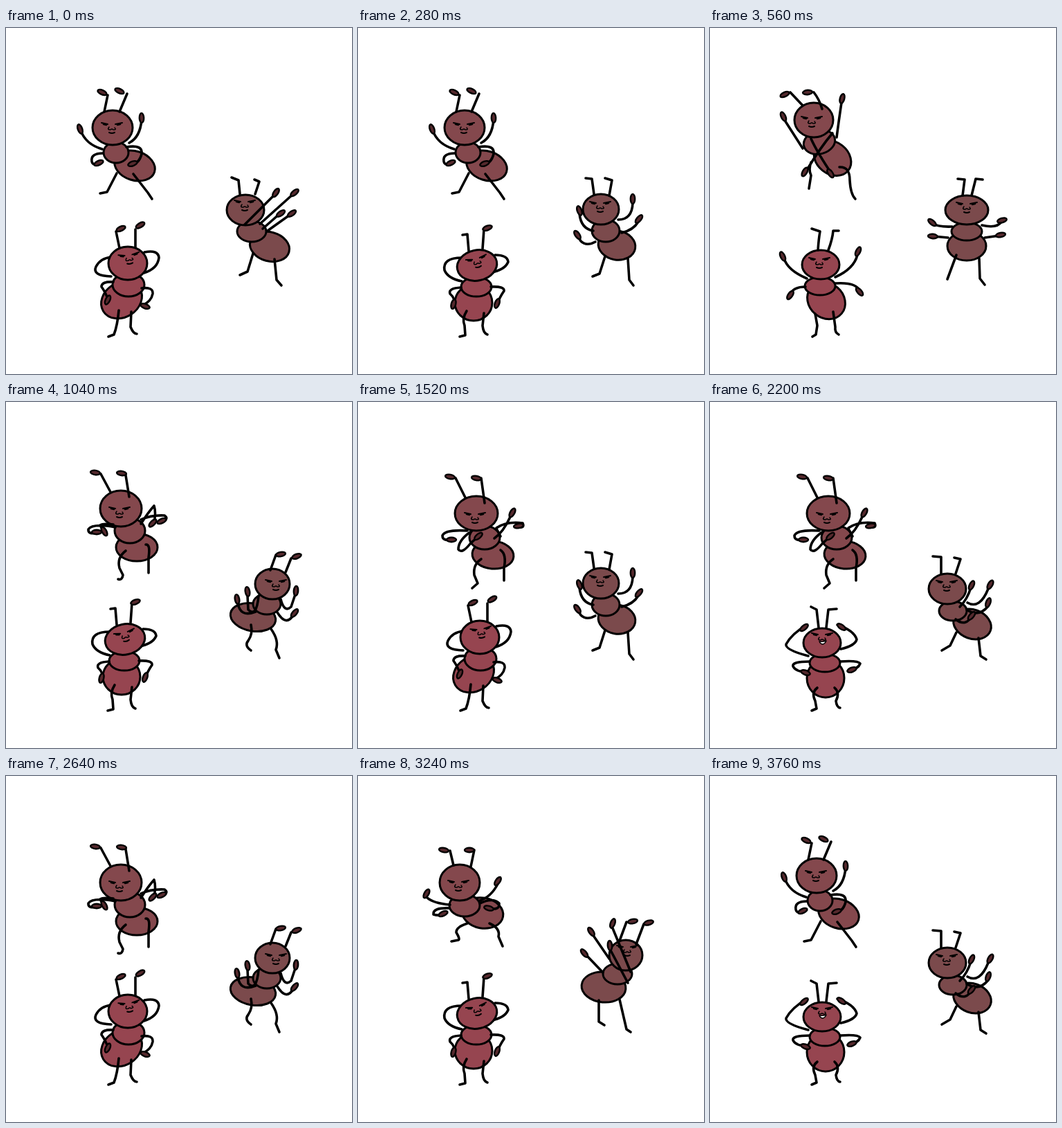
An HTML page with a canvas that plays this animation: 500x500 px, repeating every 3.84 s.

```html
<!DOCTYPE html>
<html lang="en">
<head>
<meta charset="utf-8">
<title>Dancing ants</title>
<style>
  html, body { margin: 0; width: 100%; height: 100%; overflow: hidden; background: #fff; }
  canvas { display: block; width: 100vmin; height: 100vmin; }
</style>
</head>
<body>
<canvas id="stage" width="500" height="500"></canvas>
<script>
const ctx = document.getElementById('stage').getContext('2d');
const LOOP = 3840, TICK = 40;

// body: abdomen, thorax, head as [x, y, rx, ry, degrees]; tips: [x, y, degrees]; face: [x, y, degrees]
const pose = (body, line, tips, face, extra) => ({ body, line, tips, face, ...extra });

const top0 = pose(
  [[186, 199, 30, 21, 18], [159, 180, 18, 15, 0], [154, 144, 29, 25, 0]],
  `M142 121L147 97M164 121L175 95M139 175Q115 168 108 148M178 166Q194 158 196 132
   M140 181Q122 181 124 193Q126 200 134 195M174 172Q198 168 196 182Q192 198 178 197
   M160 210L146 237 136 239M184 211L205 238 211 247`,
  [[139, 93, 25], [164, 91, 25], [107, 146, 70], [196, 130, 88], [134, 195, -25], [183, 196, -20]],
  [153, 143, 0]);

const top1 = pose(
  [[177, 188, 29, 23, 38], [158, 165, 23, 17, -15], [150, 133, 28, 25, 0]],
  `M134 112L116 93M162 117Q158 103 150 93M134 174L109 135M183 158Q186 135 190 108
   M177 152Q160 172 140 205M146 160Q155 180 178 214
   M146 194Q142 205 146 213L143 232M187 201Q202 200 202 220Q203 240 210 247`,
  [[108, 96, -25], [141, 93, -5], [106, 128, 65], [191, 102, -75], [137, 208, -60], [174, 210, 55]],
  [147, 134, 0]);

const top2 = pose(
  [[195, 221, 30, 20, 5], [183, 196, 22, 17, 0], [171, 161, 31, 25, 0]],
  `M155 138L141 110M183 146L178 110M158 186Q126 184 122 193Q122 202 136 198
   M162 188Q145 200 145 213Q150 220 162 205L176 192M197 197Q210 188 220 166
   M200 182Q215 172 238 175Q242 184 228 180M200 183L206 194
   M178 227Q166 235 168 250L173 262 165 269M206 214Q215 220 211 240L211 258`,
  [[133, 108, 10], [171, 110, 10], [135, 199, 0], [174, 194, -40], [223, 160, -60], [232, 179, -10]],
  [169, 166, 0]);

const top3 = pose(
  [[189, 210, 30, 20, 0], [179, 186, 22, 18, 0], [166, 154, 30, 26, 0]],
  `M151 130L137 104M178 137L173 106M158 181Q125 175 119 184Q118 192 132 189
   M155 177Q140 175 136 178Q140 186 144 190M195 176Q205 160 214 150Q217 160 214 174
   M195 170Q210 163 229 164Q237 170 222 174
   M173 215Q160 225 164 240L169 250Q168 258 162 256M202 206Q209 205 206 225L206 247`,
  [[129, 102, 8], [167, 103, 8], [131, 188, 0], [142, 187, 60], [212, 175, -45], [225, 172, -25]],
  [164, 158, 0]);

const top4 = pose(
  [[180, 198, 30, 22, 10], [154, 187, 22, 16, 0], [147, 154, 29, 26, 0]],
  `M138 129L133 108M163 131L168 107M133 186Q108 184 99 175
   M132 191Q108 190 109 200Q118 203 126 198M176 180Q192 175 202 156
   M176 184Q195 175 204 184Q205 195 188 191
   M158 213Q142 218 142 226Q148 236 145 237L135 239M190 213Q206 220 203 232L209 246`,
  [[124, 107, 10], [161, 107, 0], [99, 170, -60], [123, 199, -25], [202, 152, -55], [189, 191, 15]],
  [145, 157, 0]);

const right0 = pose(
  [[381, 316, 29, 21, 15], [355, 294, 21, 15, 0], [346, 263, 27, 22, 0]],
  `M338 240L336 220 326 216M360 240L366 222 359 219M345 284L388 241M367 283L415 240
   M371 290L396 268M378 293L413 268M357 326L349 352 338 357M388 334L391 364 398 372`,
  [[390, 238, -55], [417, 238, -40], [397, 268, -35], [413, 268, -35]],
  [345, 255, 0]);

const right1 = pose(
  [[371, 315, 28, 21, 0], [371, 294, 22, 13, 0], [371, 263, 31, 21, 0]],
  `M365 242L368 219 358 218M378 242L384 218 394 219M350 287Q330 288 321 282
   M393 285Q415 290 421 280M344 303L323 301M397 303L418 300
   M356 328L343 363M389 333L390 362 397 371`,
  [[321, 281, 40], [422, 278, -15], [322, 301, 5], [420, 299, -10]],
  [371, 258, 0]);

const right2 = pose(
  [[374, 314, 27, 21, 10], [358, 293, 20, 16, 0], [351, 262, 26, 22, 0]],
  `M341 240L338 218 329 217M363 242L367 220 357 217M340 293Q322 290 320 268
   M376 277Q396 277 397 253M343 309Q330 316 322 308L317 300M381 296Q398 292 405 280
   M357 330L349 355 339 359M390 333L392 364 398 372`,
  [[320, 264, 70], [397, 247, 90], [317, 299, 55], [406, 276, -50]],
  [350, 257, 0]);

const right3 = pose(
  [[379, 321, 28, 21, 20], [351, 302, 20, 14, 0], [343, 270, 27, 22, 0]],
  `M334 248L334 224 322 223M355 248L362 227 353 225M361 296Q372 285 377 268
   M372 290Q390 300 402 270M371 300Q388 312 402 295M355 314Q370 326 379 308
   M356 333L347 352 335 359M388 341L391 367 399 372`,
  [[378, 265, -65], [405, 264, -60], [402, 290, -70], [378, 309, -50]],
  [342, 264, 0]);

const right4 = pose(
  [[357, 311, 33, 20, 10], [377, 292, 20, 15, 0], [385, 263, 25, 22, 0]],
  `M382 243L390 221M404 246L412 226M361 303Q338 312 335 290M365 280Q362 312 350 300L349 280
   M392 304Q405 325 415 308M397 285Q402 305 412 296L418 278
   M354 322Q357 335 350 345Q344 352 354 359M383 328Q395 345 390 358L395 370`,
  [[397, 220, -10], [420, 223, -20], [334, 285, 80], [349, 274, 80], [419, 273, -85], [417, 305, -50]],
  [390, 263, 0]);

const right5 = pose(
  [[355, 305, 32, 22, 5], [375, 286, 21, 15, 0], [387, 259, 24, 22, 0]],
  `M378 238L388 211M402 243L413 214M363 264L339 229M394 283L368 220M354 284L331 260
   M390 299L364 250M348 324L348 355 356 360M378 323L388 366 394 370`,
  [[397, 210, -10], [420, 212, -15], [337, 225, 55], [368, 213, -70], [327, 256, 50], [364, 245, 85]],
  [389, 251, 0]);

const low0 = pose(
  [[167, 393, 31, 25, -32], [177, 371, 23, 17, 0], [176, 340, 28, 24, 0]],
  `M164 318L159 294M187 317L187 291M155 367Q138 366 138 374Q144 382 148 394
   M196 376Q213 374 212 384Q210 395 197 401
   M163 408Q161 430 156 443L148 446M181 410L180 432Q184 442 189 442`,
  [[166, 290, -25], [194, 285, -30], [147, 393, -65], [201, 402, 20]],
  [178, 332, -8],
  { back: 'M152 331Q136 333 130 345Q124 358 152 359M200 324Q220 320 221 332Q219 348 199 354' });

const low1 = pose(
  [[168, 394, 29, 25, 40], [159, 373, 22, 13, 0], [160, 342, 27, 21, 0]],
  `M156 321Q157 305 159 294L147 290M171 321Q177 305 178 293L186 293
   M140 362Q112 350 107 333M181 360Q208 348 213 328M138 374Q120 374 116 385M181 369Q212 367 216 380
   M152 413L155 430 153 443 148 446M178 410L181 432Q180 440 186 443`,
  [[105, 330, 65], [214, 323, -65], [116, 386, -55], [216, 381, 50]],
  [158, 338, 0]);

const low2 = pose(
  [[167, 399, 27, 28, 0], [166, 377, 22, 13, 0], [162, 348, 27, 21, 0]],
  `M157 326L154 300 146 296M168 326L171 300 183 299M142 367Q108 358 110 350Q118 335 140 322
   M189 357Q210 352 212 343Q208 330 184 322M144 375Q118 375 120 382Q124 390 140 390
   M188 375Q214 373 217 378Q214 386 202 387
   M155 413Q146 420 152 432L154 443 147 446M180 413Q188 420 182 432Q183 441 188 442`,
  [[136, 326, -40], [190, 325, 35], [138, 391, 20], [205, 387, -20]],
  [162, 340, 0], { smile: true });

const low3 = pose(
  [[167, 397, 27, 26, 0], [171, 374, 22, 14, 0], [172, 343, 29, 22, -12]],
  `M160 322L158 298 151 299M180 319L182 291M149 375Q130 376 133 384Q142 392 139 402
   M192 374Q212 373 211 380Q204 390 201 400
   M157 409Q150 420 154 430L155 444 147 446M182 412L180 430Q181 441 187 443`,
  [[187, 289, -20], [138, 399, -75], [201, 398, -70]],
  [172, 337, -15],
  { back: 'M150 332Q122 332 125 350Q130 362 150 366M198 328Q216 328 217 338Q212 350 192 353' });

const leap = { ...top3, shift: [-5, -29] };
const dip = { ...top2, shift: [2, 5] };

// moves: "pose@tick", each held until the next one
const ants = [
  { fill: '#84484d', poses: [top0, top1, top2, top3, top4, leap, dip],
    moves: '0@0 4@8 1@13 5@22 3@26 2@30 6@34 2@38 6@42 2@46 6@50 2@54 6@59 3@64 5@70 1@76 4@80 0@88' },
  { fill: '#7b4a4c', poses: [right0, right1, right2, right3, right4, right5],
    moves: '0@0 3@3 2@7 1@12 4@18 5@22 4@26 5@30 1@34 2@37 3@40 0@44 3@47 2@50 3@54 2@57 1@61 4@65 5@69 4@73 1@76 4@78 5@81 4@84 1@86 2@88 3@92' },
  { fill: '#964550', poses: [low0, low1, low2, low3],
    moves: '0@0 3@4 2@8 1@11 2@16 3@18 0@22 3@26 2@30 1@32 2@34 0@38 3@41 1@45 2@48 0@51 2@55 1@57 3@60 0@64 3@70 2@74 1@77 3@80 0@83 3@85 0@88 2@92' }
];
for (const ant of ants)
  ant.keys = ant.moves.split(' ').map(m => m.split('@').map(Number));

const rad = deg => deg * Math.PI / 180;

function blob(x, y, rx, ry, deg, fill) {
  ctx.beginPath();
  ctx.ellipse(x, y, rx, ry, rad(deg), 0, 2 * Math.PI);
  ctx.fillStyle = fill;
  ctx.fill();
  ctx.stroke();
}

function strokes(d, width) {
  ctx.lineWidth = width;
  ctx.stroke(new Path2D(d));
}

function drawFace([x, y, deg], smile) {
  ctx.save();
  ctx.translate(x, y);
  ctx.rotate(rad(deg));
  strokes('M-15 -6L-6 -4M5 -4L15 -6', 2);
  strokes('M-12 -4L-8 -3M8 -3L12 -4', 2.5);
  strokes('M-4 0Q-7 4 -3 4M-2 4Q0 2 2 4M4 1Q7 4 3 4', 1.5);
  if (smile) {
    ctx.fillStyle = '#fff';
    const mouth = new Path2D('M-4 6Q1 7 6 5Q4 10 0 10Q-3 9 -4 6Z');
    ctx.fill(mouth);
    ctx.stroke(mouth);
  } else {
    strokes('M-4 8Q0 10 4 8', 2);
  }
  ctx.restore();
}

function drawAnt(p, fill) {
  ctx.save();
  ctx.translate(...(p.shift || [0, 0]));
  if (p.back) strokes(p.back, 3.6);
  ctx.lineWidth = 3;
  for (const part of p.body) blob(...part, fill);
  drawFace(p.face, p.smile);
  strokes(p.line, 3.6);
  ctx.lineWidth = 2.4;
  for (const [x, y, deg] of p.tips) blob(x, y, 7, 3.2, deg, '#55292d');
  ctx.restore();
}

function frame(now) {
  const tick = Math.floor(now % LOOP / TICK);
  ctx.fillStyle = '#fff';
  ctx.fillRect(0, 0, 500, 500);
  ctx.strokeStyle = '#000';
  ctx.lineCap = ctx.lineJoin = 'round';
  for (const { fill, poses, keys } of ants) {
    const [index] = keys.filter(k => k[1] <= tick).pop();
    drawAnt(poses[index], fill);
  }
  requestAnimationFrame(() => frame(performance.now()));
}
frame(0);
</script>
</body>
</html>
```
